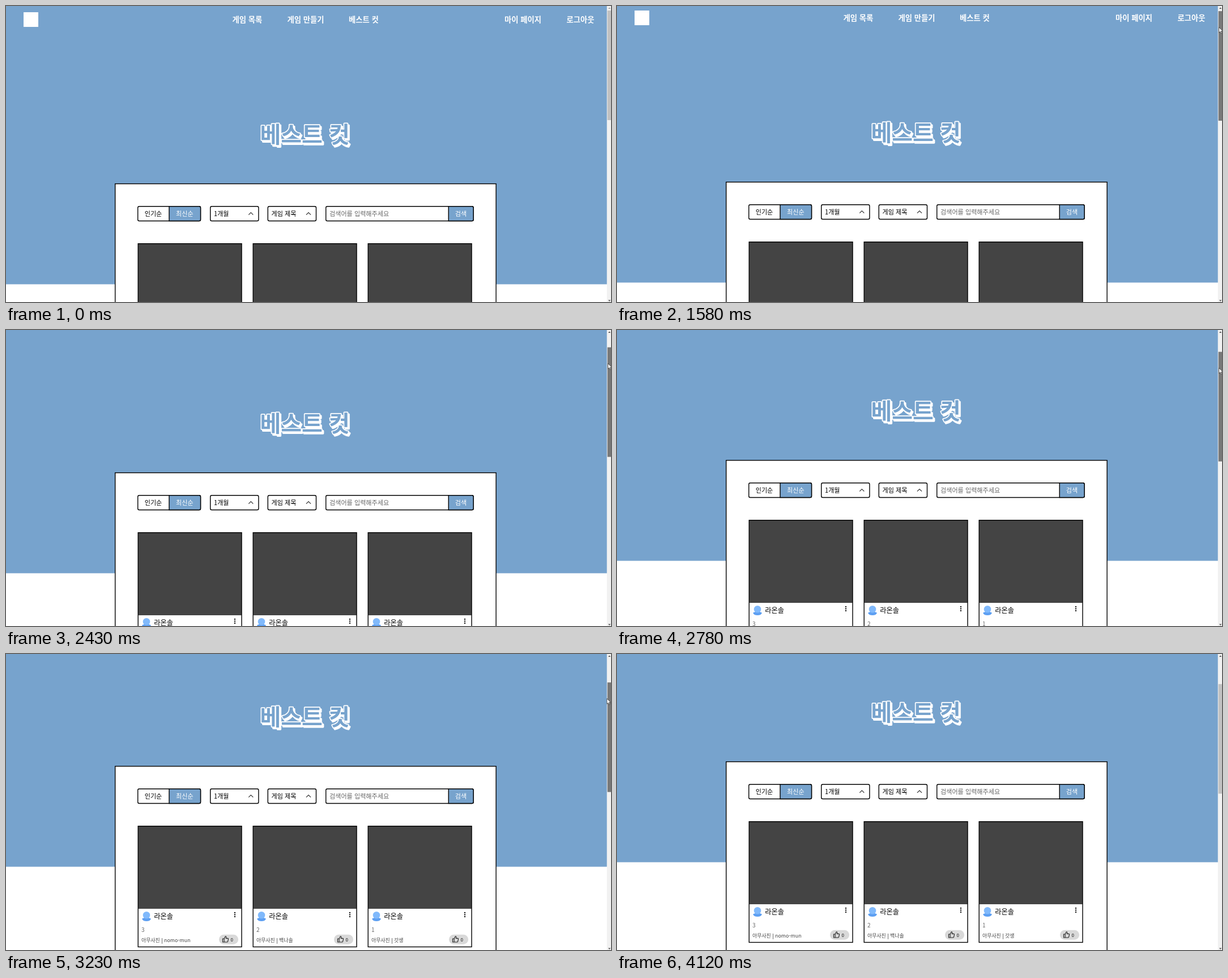
An HTML page for the animation above (4.89 s loop, 1068 by 524 pixels).

```html
<!DOCTYPE html>
<html lang="ko">
<head>
<meta charset="utf-8">
<style>
  html, body { margin: 0; width: 100%; height: 100%; overflow: hidden; background: #fff; }
  svg { display: block; font-family: "Noto Sans CJK KR", "Noto Sans KR", "Noto Sans CJK", sans-serif; }
  .nav { font-size: 13.33px; font-weight: 700; fill: #fff; }
  .ui { font-size: 11.1px; font-weight: 500; }
  .title { font-size: 40px; font-weight: 700; stroke: #fff; stroke-linejoin: round; }
  .name { font-size: 12.2px; font-weight: 500; }
  .small { font-size: 8.9px; fill: #444; }
  .box { fill: #fff; stroke: #000; stroke-width: 1.4; }
  .line { fill: none; stroke: #222; stroke-width: 1.1; stroke-linejoin: round; }
</style>
</head>
<body>
<svg width="1068" height="524" viewBox="0 0 1068 524">
  <g id="page"></g>
  <rect x="1060.7" width="8" height="524" fill="#f1f1f1"/>
  <path id="up" d="M1063 5h4.4l-2.2-2.6z"/>
  <path d="M1063 520.5h4.4l-2.2 2.6z" fill="#505050"/>
  <rect id="thumb" x="1061.7" width="6.3" height="194"/>
  <path id="cursor" d="M0 0V9.6L2.2 7.6L3.7 11L5.2 10.3L3.8 7H6.7Z" fill="#fff" stroke="#222" stroke-width=".7"/>
</svg>
<script>
const $ = id => document.getElementById(id);
const BLUE = '#77a3cd';
const LOOP = 4890;

const text = (cls, x, y, str, extra = '') => `<text class="${cls}" x="${x}" y="${y}" ${extra}>${str}</text>`;
const box = (x, w) => `<rect class="box" x="${x}" y="354.7" width="${w}" height="25.8" rx="2.5"/>`;
const button = (x, w) => `<path d="M${x} 354.7h${w - 2.5}q2.5 0 2.5 2.5v20.8q0 2.5 -2.5 2.5h${2.5 - w}z"
  fill="${BLUE}" stroke="#000" stroke-width="1.4"/>`;
const chevron = x => `<path class="line" d="M${x - 4} 369.7l4-4 4 4"/>`;

function card(x, number, game) {
  const dots = [574, 577.5, 581].map(y => `<circle cx="171.5" cy="${y}" r="1.15"/>`).join('');
  return `<g transform="translate(${x})">
    <rect x=".7" y="420.7" width="182.8" height="213.8" fill="#fff"/>
    <rect x=".7" y="420.7" width="182.8" height="146.3" fill="#444"/>
    <rect x=".7" y="420.7" width="182.8" height="213.8" fill="none" stroke="#000" stroke-width="1.4"/>
    <path d="M7.5 584.5q8 -4 16 0q-1.5 4.5 -8 4.5t-8-4.5z" fill="#5d9ff2"/>
    <circle cx="15.5" cy="578.3" r="6.3" fill="#80b9fb"/>
    ${text('name', 28.8, 585, '라온솔')}${dots}
    ${text('small', 6.5, 607.6, number, 'style="font-size:10px;fill:#666"')}
    ${text('small', 6.5, 625.8, `아무사진 <tspan fill="#000">|</tspan> ${game}`)}
    <rect x="143.5" y="612.8" width="34" height="17" rx="8.5" fill="#d9d9d9"/>
    <path class="line" d="M150 620h2.6v6H150zM152.6 620l2.2-4.2q1.6 0 1.4 1.6l-.4 2h3.4q1 .2 .8 1.4l-1 4.2q-.3 1-1.3 1h-5.1"/>
    ${text('small', 164, 624.5, 0, 'style="font-size:8px;fill:#111"')}
  </g>`;
}

const nav = [[399.5, '게임 목록'], [496.5, '게임 만들기'], [605, '베스트 컷'], [880, '마이 페이지'], [989.5, '로그아웃']];
const cards = [[3, 'nomo-mun'], [2, '백나솔'], [1, '갓생']];

$('page').innerHTML = `
  <rect width="1061" height="492.6" fill="${BLUE}"/>
  <rect x="31" y="11" width="26" height="26" fill="#fff"/>
  ${nav.map(([x, s]) => text('nav', x, 29, s)).join('')}
  ${text('title', 451, 244.5, '베스트 컷', 'fill="#fff" stroke-width="3.4"')}
  ${text('title', 448.5, 242, '베스트 컷', `fill="${BLUE}" stroke-width="3.4" paint-order="stroke"`)}
  <rect class="box" x="192.7" y="314.7" width="672.4" height="500"/>
  ${box(232.7, 110.8)}${button(288, 55.5)}
  ${text('ui', 244.7, 371.6, '인기순')}${text('ui', 300, 371.6, '최신순', 'fill="#fff"')}
  ${box(360.7, 85.2)}${text('ui', 367, 371.6, '1개월')}${chevron(432.3)}
  ${box(462.3, 85.2)}${text('ui', 468.6, 371.6, '게임 제목')}${chevron(534)}
  ${box(564.7, 260.4)}${button(781.2, 43.9)}
  ${text('ui', 571, 371.6, '검색어를 입력해주세요', 'style="font-weight:400" fill="#666"')}
  ${text('ui', 792.7, 371.6, '검색', 'fill="#fff"')}
  ${cards.map(([n, g], i) => card(232.5 + 203 * i, n, g)).join('')}`;

// Linear interpolation over [time, value] pairs
function at(keys, t) {
  const i = keys.findIndex(k => k[0] > t);
  if (i < 0) return keys[keys.length - 1][1];
  if (!i) return keys[0][1];
  const [t0, a] = keys[i - 1], [t1, b] = keys[i];
  return a + (b - a) * (t - t0) / (t1 - t0);
}

const scrollKeys = [[1380, 0], [1580, 3], [1830, 14], [2030, 27], [2430, 62], [2780, 84],
  [3230, 116], [3550, 122], [3600, 122], [3750, 124]];
const cursorX = [[360, 1031], [860, 1062], [960, 1062.6], [2780, 1062.6], [3230, 1060.8], [3870, 1060], [4070, 1038]];
const cursorY = [[360, -4], [860, 33], [960, 36.5]];
const leaveY = [[3870, 81.5], [4070, 22]];

function draw(now) {
  const raw = now % LOOP;
  // The screen refreshes every 50 ms, with a slightly shifting phase
  const phase = raw < 1000 ? 10 : raw < 3500 ? 30 : raw < 3800 ? 0 : 20;
  const t = Math.floor((raw - phase) / 50) * 50 + phase;
  const scroll = Math.round(at(scrollKeys, t));
  const drag = scroll * .365;
  $('page').setAttribute('transform', `translate(0 ${-scroll})`);
  $('up').setAttribute('fill', scroll ? '#505050' : '#a3a3a3');
  $('thumb').setAttribute('y', 8 + drag);
  $('thumb').setAttribute('fill', t < 910 || t >= 3750 ? '#c1c1c1' : raw < 1030 ? '#a8a8a8' : '#787878');
  const y = t < 3870 ? at(cursorY, t) + drag : at(leaveY, t);
  $('cursor').setAttribute('transform', `translate(${at(cursorX, t)} ${y})`);
  $('cursor').setAttribute('visibility', t >= 360 && t < 4120 ? 'visible' : 'hidden');
}

const start = performance.now();
function tick() {
  draw(performance.now() - start);
  requestAnimationFrame(tick);
}
tick();
</script>
</body>
</html>
```
